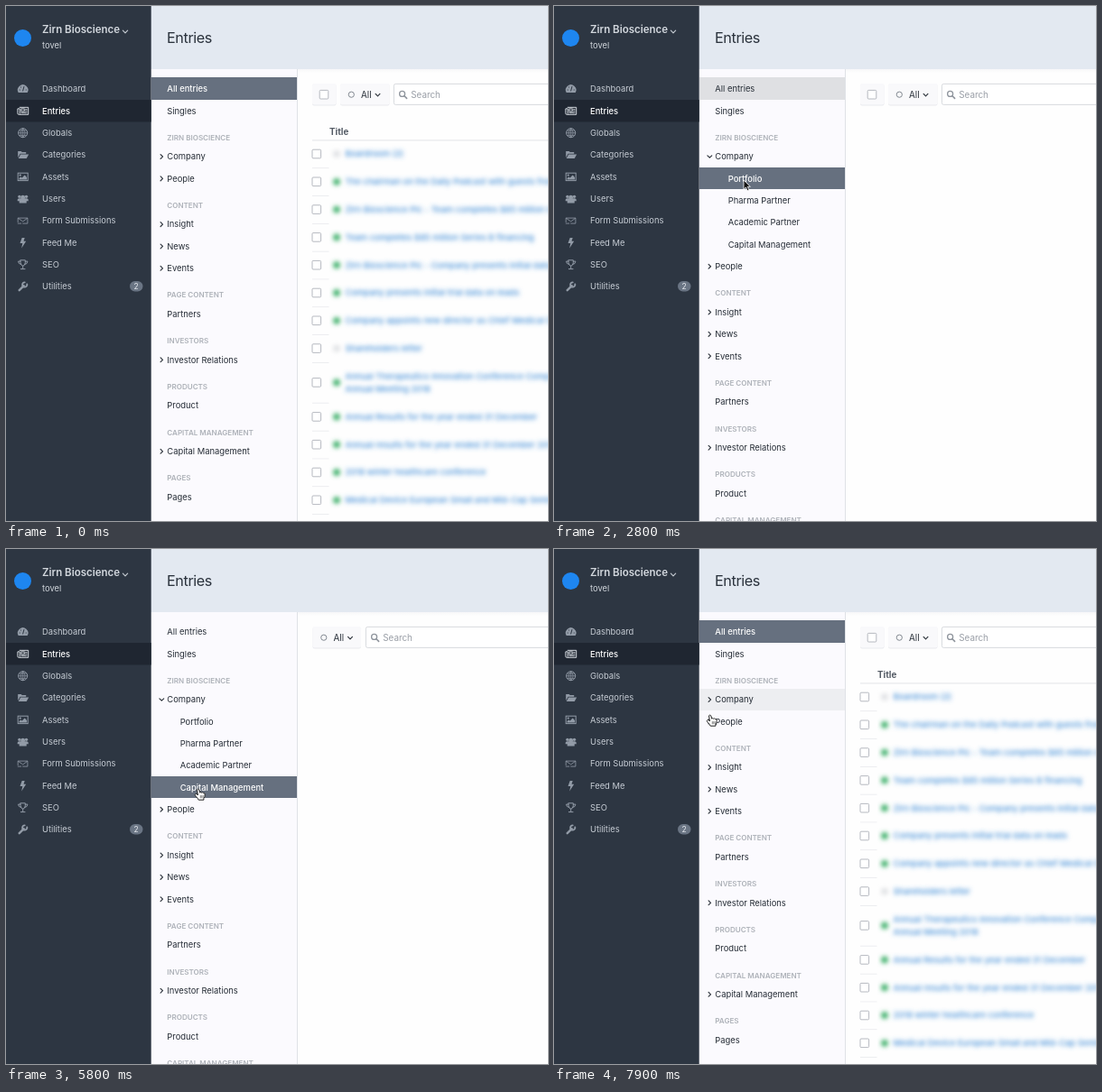
Animation of 600x571 px, one loop 8 s. Source, as an HTML page:

```html
<!DOCTYPE html>
<html lang="en">
<head>
<meta charset="utf-8">
<title>Entries</title>
<style>
html, body { margin: 0; width: 100%; height: 100%; overflow: hidden; background: #fff; }
svg { display: block; width: 100%; height: 100%; font: 9.4px Inter, "Noto Sans", sans-serif; }
.line { fill: none; stroke-linecap: round; stroke-linejoin: round; }
</style>
</head>
<body>
<svg viewBox="0 0 600 571" xmlns="http://www.w3.org/2000/svg">
  <defs>
    <filter id="blur" filterUnits="userSpaceOnUse" x="330" y="130" width="310" height="460"><feGaussianBlur stdDeviation="2.9"/></filter>
    <clipPath id="cells"><path d="M358 150H600V571H358Z"/></clipPath>
    <linearGradient id="shade" x2="0" y2="1"><stop stop-color="#dfe2e8"/><stop offset="1" stop-color="#dfe2e8" stop-opacity="0"/></linearGradient>
  </defs>
  <g id="frame"></g>
  <g id="live"></g>
</svg>
<script>
const LOOP = 8000, STEP = 100, ROW = 24.35;
const $ = id => document.getElementById(id);

const text = (x, y, s, fill, more = '') => `<text x="${x}" y="${y + 3.3}" fill="${fill}" ${more}>${s}</text>`;
const rect = (x, y, w, h, fill, more = '') => `<rect x="${x}" y="${y}" width="${w}" height="${h}" fill="${fill}" ${more}/>`;
const disc = (x, y, r, fill, more = '') => `<circle cx="${x}" cy="${y}" r="${r}" fill="${fill}" ${more}/>`;
const line = (d, color, w = 1) => `<path class="line" d="${d}" stroke="${color}" stroke-width="${w}"/>`;
const at = (x, y, body, turn = 0) => `<g transform="translate(${x} ${y}) rotate(${turn})">${body}</g>`;
const chevron = (x, y, turn, color, size = 1) =>
  at(x, y, line(`M${-1.2 * size} ${-2.4 * size}L${1.2 * size} 0L${-1.2 * size} ${2.4 * size}`, color, 1.2), turn);

// ---------- fixed frame: main menu and header ----------
const ink = '#929ba7', dark = '#2d3642';
const menu = [
  ['Dashboard', `<path d="M-5 4A5.8 5.8 0 1 1 5 4Z" fill="${ink}"/>` + line('M0 2L1.2-2.5M-3.6 1H-3.4M3.4 1H3.6M-2.3-2H-2.2', dark)],
  ['Entries', line('M-3.5-4H6V4H-4.5Q-5.8 4-5.8 2.5V-2.5H-3.5V3M3-1.8H4.3M3 0H4.3M-1.7 2H4.3', '#d5dae0') + rect(-1.8, -2.4, 3.3, 2.9, 'none', 'stroke="#d5dae0"')],
  ['Globals', disc(0, 0, 5, 'none', `stroke="${ink}"`) + line('M-5 0H5M0-5V5M-4-2.7H4M-4 2.7H4M0-5Q-5 0 0 5Q5 0 0-5', ink, .7)],
  ['Categories', `<path d="M-5.5 3V-4H-2L-1-3H3.5V-1.4H-3ZM-2.5-.6H6.5L4 4H-5Z" fill="${ink}"/>`],
  ['Assets', rect(-5.5, -4.2, 11, 8.4, 'none', `stroke="${ink}"`) + disc(-3, -1.8, 1.1, ink) + `<path d="M-4.2 3V1.5L-2.5 0L-1 1L2-2L4.3 .5V3Z" fill="${ink}"/>`],
  ['Users', [[-3.8, -2.4, 1.7], [3.8, -2.4, 1.7], [0, -1.6, 2.4]].map(([x, y, r]) => disc(x, y, r, ink)).join('')
    + `<path d="M-6 2.5V1Q-6-.5-4-.5H4Q6-.5 6 1V2.5H4V4.8H-4V2.5Z" fill="${ink}"/>`],
  ['Form Submissions', line('M-5.5 1.5V-3H5.2V3H0M-5.3-2.8L0 .8L5-2.8M-5.5 3H-2', ink, .8)],
  ['Feed Me', `<path d="M-1-5.5H2L.8-1.8H3.5L-1.5 6L-.4 .6H-3.2Z" fill="${ink}"/>`],
  ['SEO', line('M-2.6-5H2.6V-2Q2.4 1 0 1.3Q-2.4 1-2.6-2ZM-2.6-3.7H-5.2Q-5-.5-2-.3M2.6-3.7H5.2Q5-.5 2-.3M0 1.5V4M-2.3 4.8H2.3', ink)],
  ['Utilities', line('M-4 4L1-1', ink, 2.4) + line('M4.6-2.6A2.6 2.6 0 1 1 2-4.8', ink, 1.9)]
];

$('frame').innerHTML =
  rect(0, 0, 600, 571, '#fefefe') +
  rect(160, 0, 440, 70, '#e3e9f1') +
  rect(160, 70, 162, 501, '#fbfafe') +
  rect(322, 70, 278, 4, 'url(#shade)', 'opacity=".25"') +
  rect(322, 70, .8, 501, '#d9dbe1') +
  rect(0, 0, 160.7, 571, dark) +
  rect(0, 104, 160.7, 24.5, '#1f2631') +
  disc(18.5, 35.5, 9.5, '#1e86f0') +
  text(40, 27, 'Zirn Bioscience', '#d3d8de', 'font-size="11.5" font-weight="600"') +
  chevron(132, 28.5, 90, '#c3c9d0', 1.1) +
  text(40, 44, 'tovel', '#d0d5db') +
  menu.map(([name, icon], i) => {
    const y = 92 + i * ROW;
    return at(18.7, y, icon) + text(40, y, name, i == 1 ? '#fff' : '#c6ccd4', i == 1 ? 'font-weight="500"' : '');
  }).join('') +
  rect(137, 305, 14.5, 11.5, '#6a7584', 'rx="5.7"') +
  text(144.2, 310.8, '2', '#e3e7ec', 'font-size="8.5" text-anchor="middle"') +
  text(178, 37.5, 'Entries', '#2a323c', 'font-size="16.2" letter-spacing="-.4"');

// ---------- timeline ----------
const pick = (list, t) => list.filter(([from]) => from <= t).pop()[1];

const active = [[0, 'All entries'], [2800, 'Portfolio'], [3900, 'Pharma Partner'], [5100, 'Academic Partner'],
  [5800, 'Capital Management'], [7500, 'All entries']];
const shown = [[0, 'all'], [2800, ''], [3300, 'portfolio'], [3900, ''], [4400, 'pharma'], [5100, ''],
  [5400, 'academic'], [5800, ''], [6200, 'capital'], [7500, ''], [7800, 'all']];
const hovers = [
  ['Company', 1900, 2300], ['All entries', 2800, 2900, '#dfe0e3'], ['Pharma Partner', 3500, 3900],
  ['Academic Partner', 4700, 5100], ['Capital Management', 5600, 5800], ['Academic Partner', 6500, 7000],
  ['Pharma Partner', 6600, 7000], ['Portfolio', 6700, 7100], ['Company', 7100, 8000]
];
// time, x, y of the pointer tip
const path = [
  [0, 625, 470], [100, 594, 452], [1000, 311, 279], [1600, 170, 162], [2200, 170, 162], [2500, 210, 193],
  [3000, 210, 193], [3500, 210, 213], [4600, 210, 213], [4900, 212, 246], [5500, 212, 246], [5700, 213, 266],
  [6300, 213, 266], [6600, 206, 236], [6800, 194, 201], [7200, 175, 170], [7300, 172, 167], [7700, 172, 167],
  [7900, 173, 184], [8000, 173, 184]
];

function pointer(t) {
  const i = path.findIndex(p => p[0] > t), [t0, x0, y0] = path[i - 1], [t1, x1, y1] = path[i];
  const k = (t - t0) / (t1 - t0);
  const shape = t < 2900
    ? '<path d="M0 0V10.2L2.4 8L4.1 11.8L5.9 11L4.3 7.3H7.4Z" fill="#111" stroke="#fff" stroke-width=".8"/>'
    : '<path d="M-1.5 .8Q-.3-.6 .8 .9L1.7 4.2Q2.6 3 3.6 4.2Q4.6 3.3 5.5 4.6Q7 4 7.2 6Q7.3 9 5.9 10.5V12.2H.2Q-.7 10.2-2.9 8.2Q-4.6 6-2.9 5.4Q-1.7 5.4-.6 6.9Z" fill="#fff" stroke="#222" stroke-width="1"/>'
      + line('M2.3 7.5V9.8M3.8 7.5V9.8M5.2 7.5V9.8', '#333', .6);
  return at(x0 + (x1 - x0) * k, y0 + (y1 - y0) * k, shape);
}

// ---------- sources column: # heading, > has children, - child ----------
const tree = ['All entries', 'Singles', '#ZIRN BIOSCIENCE', '>Company', '-Portfolio', '-Pharma Partner', '-Academic Partner',
  '-Capital Management', '>People', '#CONTENT', '>Insight', '>News', '>Events', '#PAGE CONTENT', 'Partners', '#INVESTORS',
  '>Investor Relations', '#PRODUCTS', 'Product', '#CAPITAL MANAGEMENT', '>Capital Management', '#PAGES', 'Pages'];

function sources(t) {
  const ease = k => 1 - (1 - Math.min(1, Math.max(0, k))) ** 2;
  const open = t < 7500 ? ease((t - 1800) / 300) : 1 - ease((t - 7400) / 200);
  const chosen = pick(active, t);
  let y = 91.9 - ROW, child = 0, prevHead = false, out = '';
  for (const item of tree) {
    const kind = '#>-'.includes(item[0]) ? item[0] : '', name = kind ? item.slice(1) : item;
    if (kind == '#') {
      y += 29.65;
      out += text(178.3, y - .3, name, '#aeb2b9', 'font-size="8.05" font-weight="600"');
      prevHead = true;
      continue;
    }
    y += prevHead ? 21.1 : kind == '-' ? ROW * open : ROW;
    prevHead = false;
    if (kind == '-' && ++child > open * 4 + .01) continue;
    const top = kind != '>' || name == 'Company';
    const on = top && name == chosen;
    const hover = top && hovers.find(h => h[0] == name && t >= h[1] && t < h[2]);
    const edge = Math.round(y - 12.45);
    if (on || hover) out += rect(161, edge, 161, Math.round(y + 11.9) - edge, on ? '#66707f' : hover[3] || '#edeef1');
    if (kind == '>') out += chevron(172.3, y, name == 'Company' ? 90 * open : 0, '#30363e');
    out += text(kind == '-' ? 192.7 : 178.3, y, name, on ? '#fff' : '#252c35', on ? 'font-weight="500"' : '');
  }
  return out;
}

// ---------- entry lists: ~ not live, | second line, _ space inside a name ----------
const news = ['~Boardroom (2)', 'The chairman on the Daily Podcast with guests from the', 'Zirn Bioscience Plc - Team completes $85 million round',
  'Team completes $85 million Series B financing', 'Zirn Bioscience Plc - Company presents initial data at', 'Company presents initial trial data on leads',
  'Company appoints new director as Chief Medical Officer', '~Shareholders letter', 'Annual Therapeutics Innovation Conference Company|Annual Meeting 2018',
  'Annual Results for the year ended 31 December', 'Annual results for the year ended 31 December 2017', '2018 winter healthcare conference',
  'Medical Device European Small and Mid-Cap Seminar'];
const lists = {
  portfolio: { date: 575, rows: 'Amber Harbour Pinewood Meadow Lagoon Meridian Park_Thorn Lanterns Heather Stone Poplar Marbles Juniper Iris'.split(' ') },
  pharma: { date: 521, rows: ['Fjord', 'Lake', 'Birch', 'Thistle'] },
  academic: { date: 521, rows: ['Orchard', 'Willow', 'Granite'] },
  capital: { rows: ['Initial Capital Management company'] }
};
const link = '#3f8cd6';
const header = (x, label) => text(x, 139.4, label, '#555c66', 'font-size="9.8" font-weight="700"');
const box = (x, y) => rect(x, y, 9.6, 9.6, '#fff', 'rx="1" stroke="#aeb2b9" stroke-width=".9"');
const blurred = body => `<g clip-path="url(#cells)"><g filter="url(#blur)" font-weight="500">${body}</g></g>`;
const rule = y => rect(339, y, 18.5, .7, '#e6e7eb');

function allRows() {
  let y = 164, plain = '', soft = '';
  for (const row of news) {
    const lines = row.replace('~', '').split('|');
    if (lines[1]) y += 7;
    plain += box(339, y - 4.8) + rule(y + 15.4 + (lines[1] ? 7 : 0));
    soft += disc(366, y, 3.9, row[0] == '~' ? '#dfe1e4' : '#3fb06c');
    lines.forEach((s, i) => soft += text(375.5, y + (lines[1] ? i * 14 - 7 : 0), s, link));
    y += lines[1] ? 38 : 30.8;
  }
  return header(358, 'Title') + plain + blurred(soft);
}

function sectionRows({ date, rows }) {
  let plain = header(339.5, 'Title'), soft = '';
  if (date) plain += header(date, 'Post Date');
  rows.forEach((name, i) => {
    const y = 164.5 + i * 30.75;
    plain += (date ? disc(348, y, 3.9, '#23a455') : disc(348, y, 3.5, '#fff', 'stroke="#7b818a" stroke-width=".9"')) + rule(y + 15);
    soft += text(358, y - .5, name.replace('_', ' '), link);
    if (date) soft += text(date, y - .5, '08/11/2018', '#7d8085');
  });
  return plain + blurred(soft);
}

function toolbar(full) {
  const x = full ? 370 : 339.5, w = full ? 54.5 : 53.5, field = full ? 429 : 398;
  const button = (x, w) => rect(x, 86.5, w, 24, '#e9eaee', 'rx="2"') + rect(x, 86, w, 23.5, '#f9f9fb', 'rx="2"');
  return (full ? button(339, 26.5) + box(347.2, 93.4) : '') + button(x, w) +
    disc(x + 12.3, 98.2, 3.1, 'none', 'stroke="#777d86" stroke-width=".9"') +
    text(x + 23, 98.2, 'All', '#2a313a', 'font-size="9.8"') +
    chevron(x + 41.5, 98.6, 90, '#30363e') +
    rect(field + .4, 86.4, 220, 23, '#fff', 'rx="2" stroke="#d3d6db" stroke-width=".9"') +
    disc(field + 9.6, 97.4, 3, 'none', 'stroke="#8e949c" stroke-width="1.3"') +
    line(`M${field + 12} 99.8l2.6 2.6`, '#8e949c', 1.6) +
    text(field + 19.3, 98.2, 'Search', '#9a9fa7', 'font-size="9.8"');
}

function content(t) {
  const view = pick(shown, t);
  const rows = view == 'all' ? allRows() : view ? sectionRows(lists[view]) : '';
  return toolbar(t < 3300 || t >= 7800) + (view ? rect(339, 148.5, 261, .9, '#dfe1e6') : '') + rows;
}

let last = -1;
function draw() {
  const t = Math.floor(performance.now() % LOOP / STEP) * STEP;
  if (t != last) $('live').innerHTML = content(t) + sources(t) + pointer(t);
  last = t;
  requestAnimationFrame(draw);
}
draw();
</script>
</body>
</html>
```
